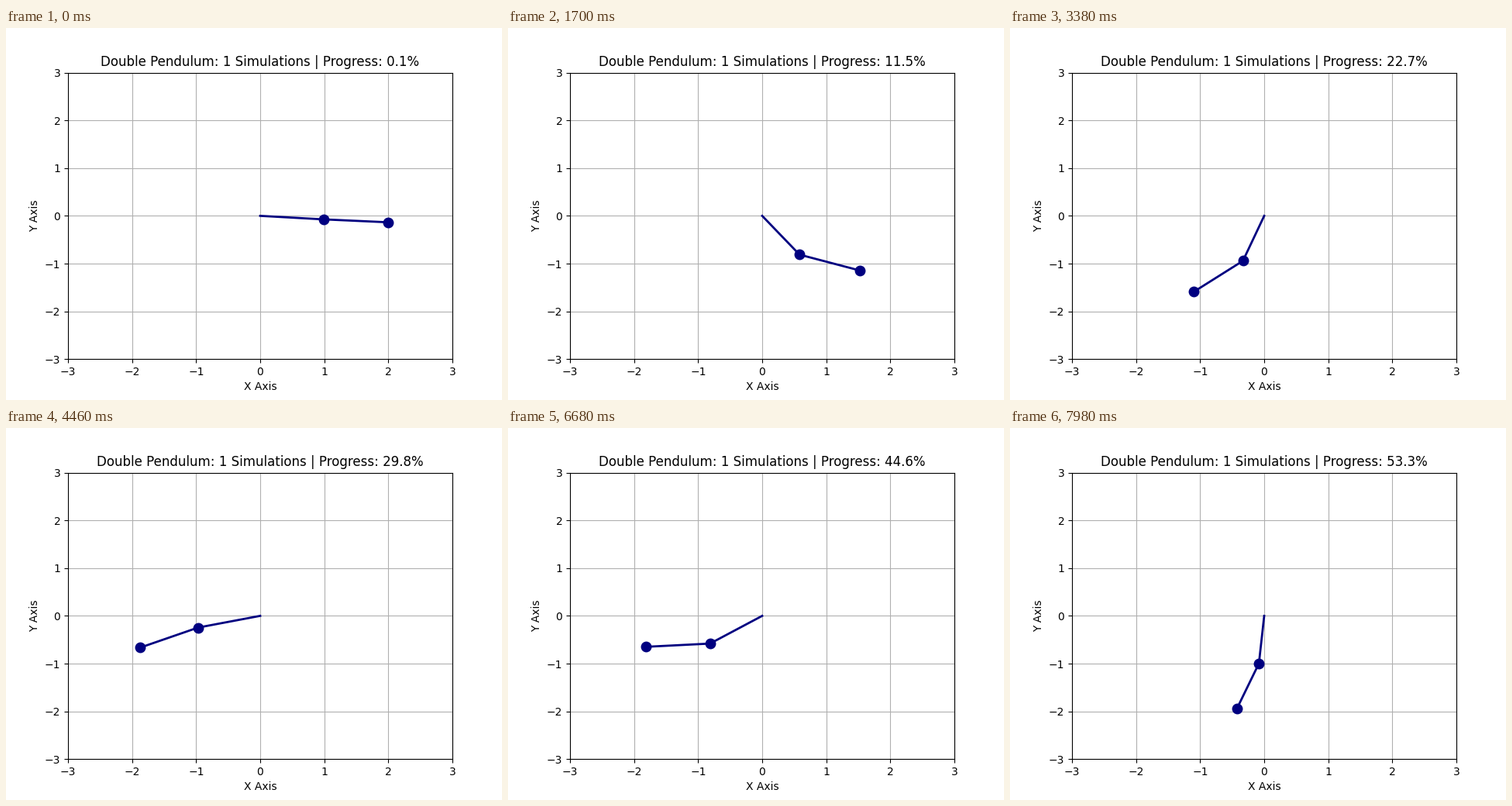
Recreate the animation shown at these times as a matplotlib script. Size 640x480 px, loop 8000 ms.

```python
from math import cos, sin

import matplotlib.pyplot as plt
import numpy as np
from matplotlib.animation import FuncAnimation

FRAMES, INTERVAL = 400, 20
SAMPLES, STRIDE = 1501, 2
CENTER = np.array([328, 242.4])
UNIT = np.array([496 / 6, 369.6 / 6])

# Stage positions (both bobs, in pixels) the swing passes through
WAYPOINTS = {
    0: (410, 247, 493, 251),
    85: (376, 292, 454, 313),
    169: (301, 300, 237.5, 340),
    223: (248, 257.5, 173, 283),
    286: (245, 245, 165, 257),
    334: (261, 278, 178, 282),
    399: (321, 304, 293, 362),
}


def slope(s):
    """Equal masses and unit rods; time is scaled so that gravity is 1."""
    a, b, u, v = s
    sd, cd = sin(a - b), cos(a - b)
    acc_a = (-2 * sin(a) - sd * v * v + cd * (sin(b) - sd * u * u)) / (2 - cd * cd)
    acc_b = -sin(b) + sd * u * u - cd * acc_a
    return u, v, acc_a, acc_b


def shift(s, k, h):
    return tuple(x + h * d for x, d in zip(s, k))


def rk4(s, h):
    k1 = slope(s)
    k2 = slope(shift(s, k1, h / 2))
    k3 = slope(shift(s, k2, h / 2))
    k4 = slope(shift(s, k3, h))
    return tuple(x + h / 6 * (p + 2 * q + 2 * r + w)
                 for x, p, q, r, w in zip(s, k1, k2, k3, k4))


def swing(params):
    """Positions of both bobs in every frame, shape (FRAMES, 2, 2)."""
    rate, lead, a, b = map(float, params)
    state = rk4((a, b, 0.0, 0.0), rate * lead)
    angles = []
    for _ in range(FRAMES):
        angles.append(state[:2])
        state = rk4(state, rate)
    angles = np.array(angles)
    rods = np.stack([np.sin(angles), -np.cos(angles)], axis=-1)
    return np.cumsum(rods, axis=1)


def misfit(params):
    path = swing(params)[list(WAYPOINTS)]
    pixels = CENTER + path * UNIT * (1, -1)
    return pixels.ravel() - np.array(list(WAYPOINTS.values())).ravel()


def calibrate(params, rounds=14, eps=1e-5):
    """Levenberg-Marquardt fit of pace, head start and release angles."""
    params, damping = np.array(params, float), 1e-3
    error = misfit(params)
    for _ in range(rounds):
        jac = np.array([(misfit(params + eps * e) - error) / eps
                        for e in np.eye(len(params))]).T
        normal = jac.T @ jac
        normal += damping * np.diag(np.diag(normal))
        trial = params - np.linalg.solve(normal, jac.T @ error)
        trial_error = misfit(trial)
        if trial_error @ trial_error < error @ error:
            params, error, damping = trial, trial_error, damping / 5
        else:
            damping *= 10
    return params


path = swing(calibrate([0.01685, 1.0, 1.5, 1.5]))

fig, ax = plt.subplots(figsize=(6.4, 4.8), dpi=100)
ax.set(xlim=(-3, 3), ylim=(-3, 3), xlabel="X Axis", ylabel="Y Axis")
ax.grid(True)
rods, = ax.plot([], [], color="navy", lw=2)
bobs, = ax.plot([], [], "o", color="navy", ms=9)


def update(i):
    x, y = path[i].T
    rods.set_data([0, *x], [0, *y])
    bobs.set_data(x, y)
    progress = 100 * STRIDE * (i + 1) / SAMPLES
    ax.set_title(f"Double Pendulum: 1 Simulations | Progress: {progress:.1f}%")
    return rods, bobs


anim = FuncAnimation(fig, update, frames=FRAMES, interval=INTERVAL,
                     init_func=lambda: update(0), repeat=True, repeat_delay=0)
plt.show()
```
